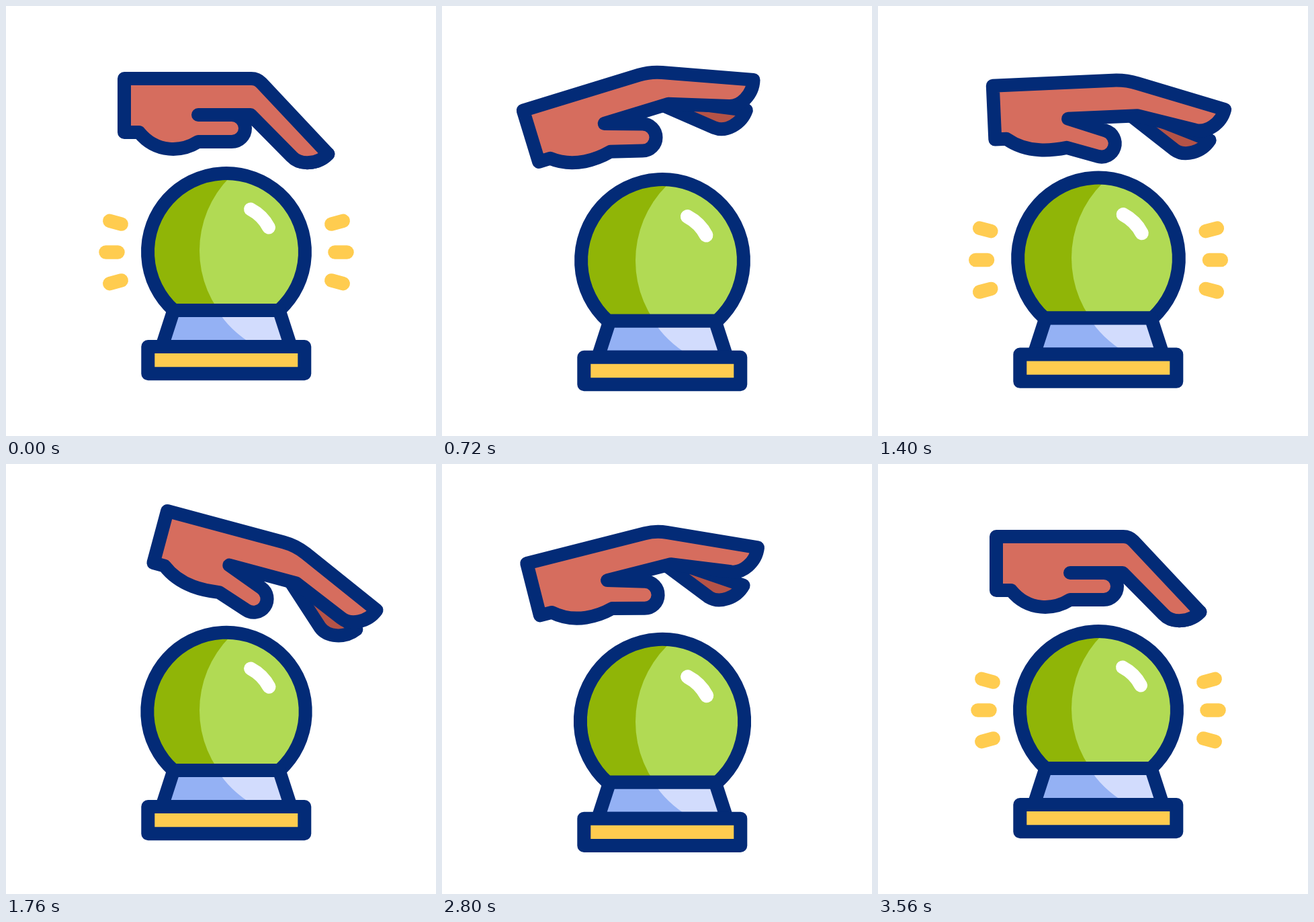
An HTML page with a canvas for the animation above (3.6 s loop, 640 by 640 pixels).

```html
<!DOCTYPE html>
<html lang="en">
<head>
<meta charset="utf-8">
<title>Crystal ball</title>
<style>
html, body { margin: 0; width: 100%; height: 100%; overflow: hidden; background: #fff; }
canvas { display: block; width: 640px; height: 640px; }
</style>
</head>
<body>
<canvas id="stage" width="640" height="640"></canvas>
<script>
const ctx = document.getElementById('stage').getContext('2d');
const LOOP = 3600, RAD = Math.PI / 180, CX = 328;
const NAVY = '#032b77', SKIN = '#d66d5e', SKIN_DARK = '#b55347', YELLOW = '#ffcc4f';
const GREEN = '#b1da54', GREEN_DARK = '#90b507', BLUE = '#94b1f4', BLUE_LIGHT = '#d2dcfd';

// Each row: time, values...
const SINK = [
  [120, 0], [380, 6], [640, 13], [920, 21.3], [1060, 19.3], [1180, 16.8], [1760, 3],
  [1890, 0.5], [2300, 9.2], [2820, 20.7], [3340, 5.5], [3560, 0]
];
// wrist x, wrist y, hand angle, front finger bend, back finger bend, openness
const HAND = [
  [120, 176, 108, 0, 46.8, 46.8, 0],
  [380, 164, 119, -4.5, 42.7, 45.8, 0.24],
  [900, 108, 166, -20.5, 15, 36.7, 1.03],
  [1060, 116, 159, -18, 15, 37, 1],
  [1760, 240, 70, 15, 23.7, 39.2, 1],
  [1900, 256, 59, 18, 23.5, 39, 1],
  [2300, 198, 93, 5.5, 24.6, 42.7, 0.85],
  [2820, 126, 148, -14.3, 23.7, 46.3, 0.77],
  [3560, 176, 108, 0, 46.8, 46.8, 0]
];
// outer end, inner end, opacity
const SPARK = [
  [0, -19, -19, 0], [40, -18.5, -19.5, 0.35], [160, -8, -15, 1],
  [350, 9, -9, 1], [490, 24, 17, 0.75], [600, 31, 31, 0]
];

// Monotone cubic interpolation, level at both ends.
function track(rows, t) {
  const last = rows.length - 1;
  if (t <= rows[0][0]) return rows[0].slice(1);
  if (t >= rows[last][0]) return rows[last].slice(1);
  let i = 0;
  while (t > rows[i + 1][0]) i++;
  const slope = (k, c) => (rows[k + 1][c] - rows[k][c]) / (rows[k + 1][0] - rows[k][0]);
  const tangent = (k, c) => {
    if (k === 0 || k === last) return 0;
    const a = slope(k - 1, c), b = slope(k, c);
    return a * b > 0 ? 2 * a * b / (a + b) : 0;
  };
  const span = rows[i + 1][0] - rows[i][0], u = (t - rows[i][0]) / span, v = 1 - u;
  return rows[i].slice(1).map((p, n) => {
    const c = n + 1, q = rows[i + 1][c];
    return p * v * v * (1 + 2 * u) + q * u * u * (3 - 2 * u) +
      span * u * v * (v * tangent(i, c) - u * tangent(i + 1, c));
  });
}

function outline(fill) {
  ctx.closePath();
  if (fill) { ctx.fillStyle = fill; ctx.fill(); }
  ctx.strokeStyle = NAVY;
  ctx.lineWidth = 20;
  ctx.stroke();
}

function sparkAge(t) {
  if (t < 1020) return 350 + Math.max(0, t - 120) * 0.54;
  return t - (t < 2140 ? 1020 : t < 3210 ? 2140 : 3210);
}

function drawSparks(t, sink) {
  const age = t > 3560 ? 350 : sparkAge(t);
  const [outer, inner, alpha] = track(SPARK, age);
  if (alpha <= 0) return;
  ctx.globalAlpha = alpha;
  ctx.strokeStyle = YELLOW;
  ctx.lineWidth = 20.5;
  for (const side of [-1, 1]) for (const row of [-1, 0, 1]) {
    const x = CX + side * (row ? 165 : 170.5), y = 366.5 + sink + row * 44.3;
    const dx = side * Math.cos(15 * RAD * row), dy = Math.sin(15 * RAD * row);
    ctx.beginPath();
    ctx.moveTo(x + dx * inner, y + dy * inner);
    ctx.lineTo(x + dx * outer + 0.01, y + dy * outer);
    ctx.stroke();
  }
  ctx.globalAlpha = 1;
}

function drawBall(sink) {
  const cy = 366 + 0.82 * sink, r = 117 + 0.25 * sink;
  const cut = Math.asin((453 + sink - cy) / r);
  const body = () => {
    ctx.beginPath();
    ctx.arc(CX, cy, r, Math.PI - cut, cut);
    ctx.closePath();
  };
  ctx.save();
  body();
  ctx.clip();
  ctx.fillStyle = GREEN_DARK;
  ctx.fillRect(180, 220, 300, 300);
  ctx.fillStyle = GREEN;
  ctx.beginPath();
  ctx.arc(443 + 0.2 * sink, 364 + 0.95 * sink, 155 + 0.2 * sink, 0, 2 * Math.PI);
  ctx.fill();
  ctx.restore();
  body();
  outline();

  ctx.save();
  ctx.translate(CX, cy);
  ctx.scale(r / 117, r / 117);
  ctx.strokeStyle = '#fff';
  ctx.lineWidth = 20;
  ctx.beginPath();
  ctx.moveTo(36, -63.5);
  ctx.quadraticCurveTo(54, -54, 63, -36.5);
  ctx.stroke();
  ctx.restore();
}

function drawStand(sink) {
  ctx.save();
  ctx.translate(0, sink);
  const collar = () => {
    ctx.beginPath();
    ctx.moveTo(249.5, 453);
    ctx.lineTo(406.5, 453);
    ctx.lineTo(424, 507);
    ctx.lineTo(232, 507);
    ctx.closePath();
  };
  collar();
  ctx.fillStyle = BLUE;
  ctx.fill();
  ctx.fillStyle = BLUE_LIGHT;
  ctx.beginPath();
  ctx.moveTo(315, 453);
  ctx.quadraticCurveTo(332, 482, 369, 505);
  ctx.lineTo(424, 507);
  ctx.lineTo(406, 453);
  ctx.fill();
  collar();
  outline();
  ctx.beginPath();
  ctx.rect(211.3, 507, 233, 40.3);
  outline(YELLOW);
  ctx.restore();
}

function drawHand(t) {
  const [x, y, angle, front, back, open] = track(HAND, t);
  const knuckle = 198, bevel = 9 + 10 * open;
  // Maps a point in finger space to hand space.
  const finger = (bend, px, py) => {
    const c = Math.cos(bend * RAD), s = Math.sin(bend * RAD);
    return [knuckle + px * c - py * s, px * s + py * c];
  };
  const fingerTip = bend => {
    ctx.lineTo(...finger(bend, 154, 0));
    ctx.bezierCurveTo(...finger(bend, 155, 22), ...finger(bend, 138, 42), ...finger(bend, 120, 42));
  };
  const palmX = 188 + 25 * open;

  ctx.save();
  ctx.translate(x, y);
  ctx.rotate(angle * RAD);

  ctx.beginPath();
  ctx.moveTo(palmX, 48);
  fingerTip(back);
  ctx.lineTo(palmX - 9 * open, 54);
  outline(SKIN_DARK);

  const thumb = 20 * open * RAD;
  ctx.beginPath();
  ctx.moveTo(0, 0);
  ctx.lineTo(knuckle - bevel, 0);
  ctx.quadraticCurveTo(knuckle, 0, ...finger(front, bevel, 0));
  fingerTip(front);
  ctx.lineTo(palmX, 54);
  ctx.lineTo(110, 54);
  ctx.arc(160 - 2 * open, 74 + 19 * open, 20, thumb - Math.PI / 2, thumb + Math.PI / 2);
  ctx.lineTo(110 - 4 * open, 94 + 3 * open);
  ctx.bezierCurveTo(86, 109 - 9 * open, 48, 112 - 8 * open, 22 - 5 * open, 80);
  ctx.lineTo(0, 80);
  outline(SKIN);
  ctx.restore();
}

function draw(t) {
  const [sink] = track(SINK, t);
  ctx.fillStyle = '#fff';
  ctx.fillRect(0, 0, 640, 640);
  ctx.lineCap = ctx.lineJoin = 'round';
  drawSparks(t, sink);
  drawBall(sink);
  drawStand(sink);
  drawHand(t);
}

const start = performance.now();
function tick() {
  draw((performance.now() - start) % LOOP);
  requestAnimationFrame(tick);
}
tick();
</script>
</body>
</html>
```
